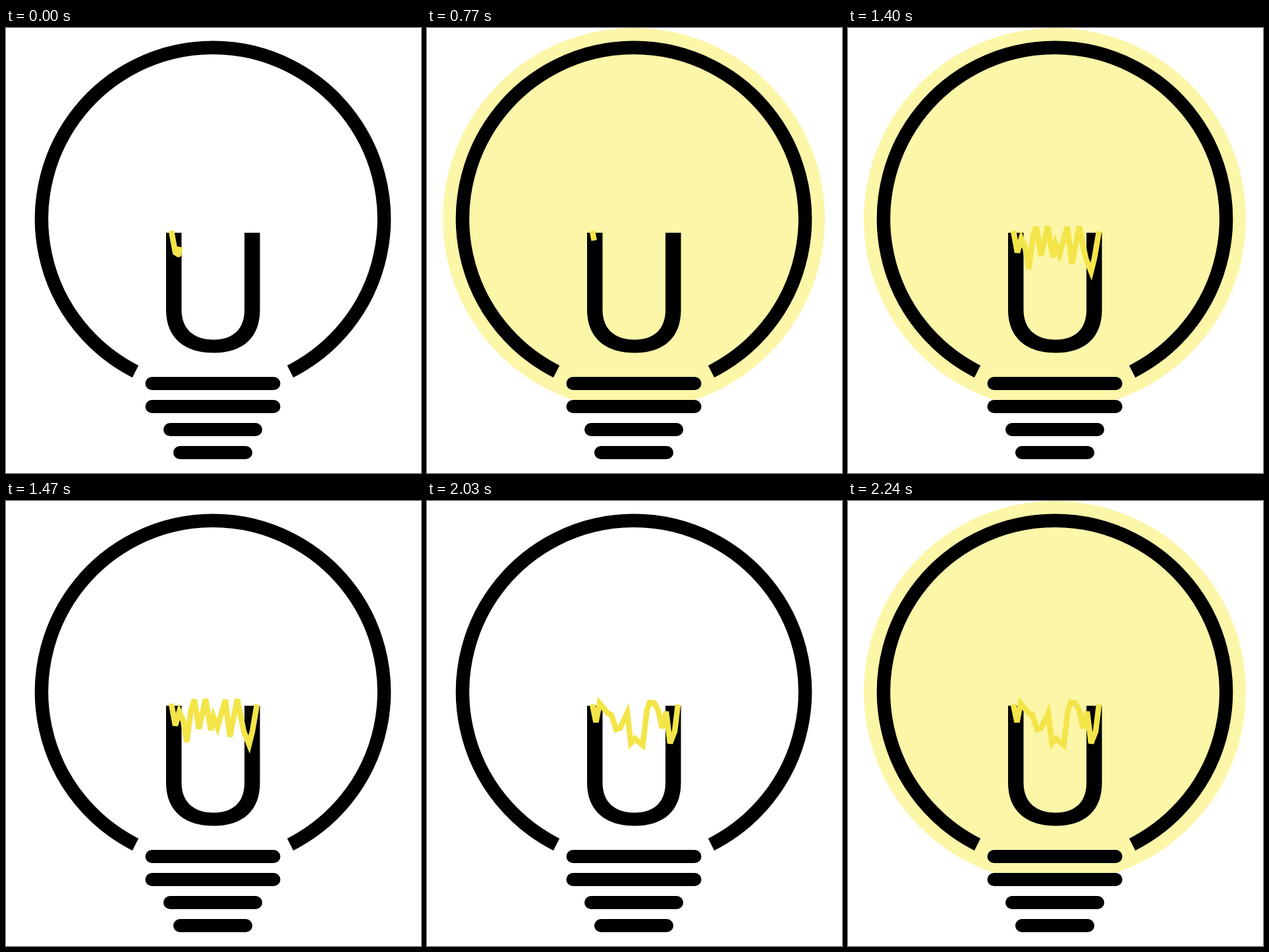
An HTML page for the animation above (2.31 s loop, 630 by 676 pixels).

```html
<!DOCTYPE html>
<html lang="en">
<head>
<meta charset="utf-8">
<title>Flickering bulb</title>
<style>
  html, body { margin: 0; width: 100%; height: 100%; overflow: hidden; background: #fff; }
  svg { display: block; width: 630px; height: 676px; }
  .line { fill: none; stroke: #000; stroke-width: 20.5; }
  .base { stroke-width: 20; stroke-linecap: round; }
  .filament { fill: none; stroke: #f3e549; stroke-width: 8.5; }
</style>
</head>
<body>
<svg viewBox="0 0 630 676">
  <circle id="glow" cx="314" cy="290" r="290" fill="#fcf6a9"/>
  <path class="line" d="M196.5 521.8A260 260 0 1 1 431.5 521.8"/>
  <path class="line base" d="M221.5 540H406.5M221.5 575H406.5M249 610H379M264 645H364"/>
  <path d="M243 311H266.5V428C266.5 457 285 473.5 315 473.5S362 457 362 428V311H385.500V428C385.500 470 360 493.500 315 493.500S243 470 243 428Z"/>
  <path class="filament" stroke-linejoin="round"
    d="M251 308L257 341L262 344L268 310L275 366L281 319L286 362L292 300L300 345L304 350L309 323L316 340L322 370L327 322L333 328L339 351L344 317L351 372L359 336L368 338L375 301L382 307"/>
  <path class="filament"
    d="M251 308L257 341L263 320L269 334L274.500 366L281 316L286 302L293 346L303 301L311 348L315 328L321 344L333 302L340 358L351 301L361 350L369 370L374 350L381 309"/>
  <path class="filament"
    d="M251 309L256.500 336L262 307L274 322L280 325L287 347L293 345L304 322L309.500 368L316 361L327.500 371L334 317L338 306L345 307L351 318L357 345L363 320L369 368L376 350L381 309"/>
</svg>
<script>
const TICK = 70, TICKS = 33, ROUND = 11, SPEED = 80;
const startLengths = [51, 15, 15];
const glow = document.getElementById("glow");
const filaments = [...document.querySelectorAll(".filament")];
const lengths = filaments.map(path => path.getTotalLength());

// Dark in the first round, then a strobe that shifts by one tick partway.
function isLit(tick) {
  if (tick < ROUND) return false;
  return tick < 16 ? tick % 2 === 1 : tick % 2 === 0;
}

function draw(ms) {
  const tick = Math.floor(ms / TICK) % TICKS;
  const round = Math.floor(tick / ROUND);
  const step = tick % ROUND;
  glow.style.display = isLit(tick) ? "" : "none";
  filaments.forEach((path, i) => {
    path.style.display = i === round ? "" : "none";
    const shown = Math.min(lengths[i], startLengths[i] + SPEED * step);
    path.style.strokeDasharray = shown < lengths[i] ? `${shown} 2000` : "none";
  });
}

let began;
function loop(now) {
  began ??= now;
  draw(now - began);
  requestAnimationFrame(loop);
}
draw(0);
requestAnimationFrame(loop);
</script>
</body>
</html>
```
